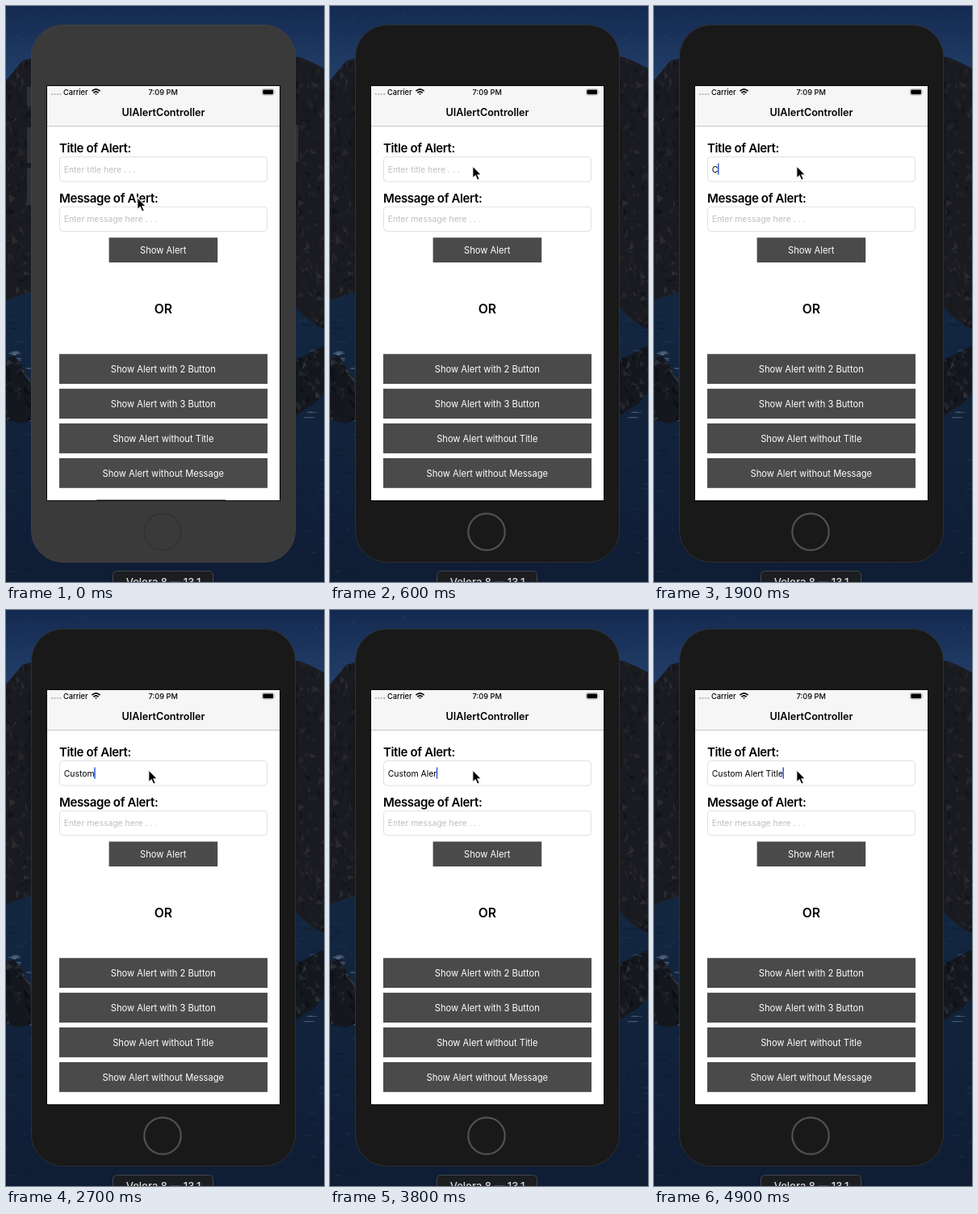
An HTML page that plays this animation: 394 by 712 pixels, repeating every 5000 ms.

```html
<!DOCTYPE html>
<html lang="en">
<head>
<meta charset="utf-8">
<title>Alert demo</title>
<style>
  html, body { margin: 0; width: 100%; height: 100%; overflow: hidden; background: #10203a; }
  svg { display: block; width: 394px; height: 712px; font-family: Inter, Roboto, sans-serif; }
  .mid { text-anchor: middle; }
  .status { font-size: 9.2px; font-weight: 500; }
  .label { font-size: 15px; font-weight: 600; letter-spacing: -.37px; }
  .input { font-size: 10.4px; }
  .hint { fill: #bfbfc2; }
  .field { fill: #fff; stroke: #e0e0e0; }
  .btn rect { fill: #4a4a4a; }
  .btn text { fill: #fff; font-size: 11.15px; text-anchor: middle; }
</style>
</head>
<body>
<svg viewBox="0 0 394 712">
  <defs>
    <linearGradient id="sky" x2="0" y2="1">
      <stop stop-color="#142a50"/><stop offset="1" stop-color="#24416c"/>
    </linearGradient>
    <linearGradient id="sea" x2="0" y2="1">
      <stop stop-color="#172a42"/><stop offset=".5" stop-color="#13263f"/><stop offset="1" stop-color="#0f1d35"/>
    </linearGradient>
    <clipPath id="cliffs"><path d="M0 92L10 80L20 68L40 62V352L22 356L0 364ZM350 60L366 64L380 70L394 77V400L380 392L366 380L350 362Z"/></clipPath>
    <clipPath id="reef"><path d="M0 436L10 432L18 442L27 458L40 470V508L20 516L0 512ZM350 440L366 434L378 428L394 420V478L382 492L368 500L350 514Z"/></clipPath>
  </defs>

  <rect width="394" height="100" fill="url(#sky)"/>
  <rect y="100" width="394" height="612" fill="url(#sea)"/>
  <g id="waves"></g>
  <g clip-path="url(#cliffs)"><rect y="55" width="394" height="350" fill="#1a1b21"/><g id="cliffRocks"></g></g>
  <g clip-path="url(#reef)"><rect y="415" width="394" height="105" fill="#14171d"/><g id="reefRocks"></g></g>

  <g id="device">
    <path id="keys" d="M26 100h6v24h-6zM26 150h6v44h-6zM26 200h6v46h-6zM357 147h5v46h-5z"/>
    <rect id="body" x="31.5" y="23.5" width="327" height="664" rx="39"/>
    <circle id="home" cx="194" cy="650" r="22.7" fill="none"/>
  </g>

  <rect x="50" y="98" width="290" height="514" fill="#080808"/>
  <rect x="51" y="99" width="288" height="512" fill="#fff"/>
  <rect x="51" y="99" width="288" height="49" fill="#f6f6f6"/>
  <rect x="51" y="148" width="288" height="1" fill="#c6c6c8"/>

  <g fill="#b0b0b0">
    <circle cx="56.9" cy="109" r="1.1"/><circle cx="60.4" cy="109" r="1.1"/>
    <circle cx="63.9" cy="109" r="1.1"/><circle cx="67.4" cy="109" r="1.1"/>
  </g>
  <text class="status" x="71" y="110">Carrier</text>
  <g fill="none" stroke="#000" stroke-width="1.6">
    <path d="M106.4 105.2Q111.5 100.6 116.6 105.2M108.4 107.3Q111.5 104.6 114.6 107.3"/>
    <path d="M110 108.2h3L111.5 109.9Z" fill="#000" stroke="none"/>
  </g>
  <text class="status mid" x="194.7" y="110">7:09 PM</text>
  <rect x="317.3" y="102.6" width="14.8" height="7.6" rx="2" fill="none" stroke="#aaa" stroke-width=".7"/>
  <rect x="318.3" y="103.6" width="12.8" height="5.6" rx="1.1"/>
  <path d="M333 105.2q1.5 1.3 0 2.6z" fill="#aaa"/>
  <text class="mid" x="195" y="136" font-size="12.6" font-weight="600">UIAlertController</text>

  <text class="label" x="66" y="181">Title of Alert:</text>
  <rect class="field" x="66.5" y="186.5" width="257" height="30.5" rx="4"/>
  <text class="input hint" id="hint" x="71.7" y="205.6">Enter title here . . .</text>
  <text class="input" id="typed" x="71.7" y="205.6"></text>
  <rect id="caret" y="194.5" width="1.6" height="14" fill="#3b62d8"/>

  <text class="label" x="66" y="242.5">Message of Alert:</text>
  <rect class="field" x="66.5" y="248.2" width="257" height="30.3" rx="4"/>
  <text class="input hint" x="71.7" y="267.2">Enter message here . . .</text>

  <g id="buttons"></g>
  <text class="mid" x="194.8" y="380" font-size="15.7" font-weight="600">OR</text>
  <rect id="peek" x="112" y="610" width="160" height="1" fill="#777"/>

  <rect x="132.5" y="698.5" width="124" height="30" rx="5" fill="#1b1d20" stroke="#43464b"/>
  <text class="mid" x="195" y="717" font-size="13" font-weight="500" fill="#dcdcdc">Velora 8 — 13.1</text>

  <path id="pointer" d="M0 0V15L3.4 11.9L5.8 17.5L8.5 16.3L6.1 10.9H10.6Z" stroke="#fff" stroke-width="1.1"/>
</svg>
<script>
const $ = id => document.getElementById(id);
const NS = 'http://www.w3.org/2000/svg';

function add(parent, tag, attrs, text = '') {
  const el = document.createElementNS(NS, tag);
  for (const k in attrs) el.setAttribute(k, attrs[k]);
  el.textContent = text;
  return parent.appendChild(el);
}

let seed = 11;
const rnd = (a, b) => {
  seed = (seed * 16807) % 2147483647;
  return a + (b - a) * seed / 2147483647;
};
const sideX = () => rnd(0, 1) < .5 ? rnd(-4, 34) : rnd(356, 398);

// Angular facets give the rocks their rough surface.
function facets(parent, count, top, bottom, colors) {
  for (let i = 0; i < count; i++) {
    const x = sideX(), y = rnd(top, bottom);
    const d = `M${x} ${y}l${rnd(2, 9)} ${rnd(2, 8)}l${rnd(-9, 1)} ${rnd(0, 7)}z`;
    add(parent, 'path', { d, fill: colors[i % colors.length], opacity: rnd(.3, .8) });
  }
}
facets($('cliffRocks'), 320, 58, 400, ['#0f1117', '#2a2a2e', '#14161c', '#24252b', '#333336']);
facets($('reefRocks'), 110, 420, 512, ['#0a0d13', '#252a31', '#39404a']);

for (let i = 0; i < 110; i++) {
  const y = rnd(350, 700), foam = y > 425 && y < 522;
  add($('waves'), 'ellipse', {
    cx: sideX(), cy: y, rx: rnd(2, 8), ry: rnd(.4, 1.3),
    fill: foam ? '#8394a8' : i % 2 ? '#0d1a2f' : '#1f3650', opacity: rnd(.25, .6)
  });
}
for (const [x, y] of [[14, 37], [29, 16], [366, 41], [384, 22], [92, 9]])
  add($('waves'), 'circle', { cx: x, cy: y, r: .6, fill: '#6f86ad', opacity: .6 });

function button(label, x, y, w, h) {
  const g = add($('buttons'), 'g', { class: 'btn' });
  add(g, 'rect', { x, y, width: w, height: h });
  add(g, 'text', { x: 194.8, y: y + h / 2 + 4.2 }, label);
}
button('Show Alert', 127.6, 286.3, 134.6, 30.7);
['with 2 Button', 'with 3 Button', 'without Title', 'without Message']
  .forEach((s, i) => button('Show Alert ' + s, 66, 430.2 + i * 42.9, 258, 36.9));

const title = 'Custom Alert Title';
const keyTimes = [1900, 2000, 2200, 2400, 2500, 2700, 2900, 3400, 3500, 3600,
  3800, 4000, 4100, 4300, 4400, 4600, 4700, 4900];
const clamp = v => Math.max(0, Math.min(1, v));

function caretAlpha(t) {
  if (t < 700) return 0;
  if (t < 1400) return clamp((1100 - t) / 300);
  return clamp((t - 1300) / 300);
}

let wasActive, wasCount;
function draw(t) {
  const active = t >= 600;
  if (active !== wasActive) {
    wasActive = active;
    $('body').setAttribute('fill', active ? '#191919' : '#3a3a3a');
    $('body').setAttribute('stroke', active ? '#303032' : '#414141');
    $('keys').setAttribute('fill', active ? '#17181b' : '#303135');
    $('home').setAttribute('stroke', active ? '#515151' : '#303030');
    $('home').setAttribute('stroke-width', active ? 2.2 : 1.2);
  }

  const count = keyTimes.filter(k => k <= t).length;
  if (count !== wasCount) {
    wasCount = count;
    const typed = $('typed');
    // A trailing space must count towards the caret position.
    typed.textContent = title.slice(0, count).replace(/ /g, '\u00a0');
    $('hint').setAttribute('visibility', count ? 'hidden' : 'visible');
    $('caret').setAttribute('x', 71.7 + (count ? typed.getComputedTextLength() - .4 : 0));
  }
  $('caret').setAttribute('opacity', caretAlpha(t));

  const p = clamp(t / 200);
  $('pointer').setAttribute('transform', `translate(${162.8 + 14 * p} ${236.6 - 38.8 * p})`);
  $('peek').setAttribute('visibility', t < 100 ? 'visible' : 'hidden');
}

const start = performance.now();
function tick() {
  const t = (performance.now() - start) % 5000;
  draw(Math.floor(t / 100) * 100);
  requestAnimationFrame(tick);
}
tick();
</script>
</body>
</html>
```
